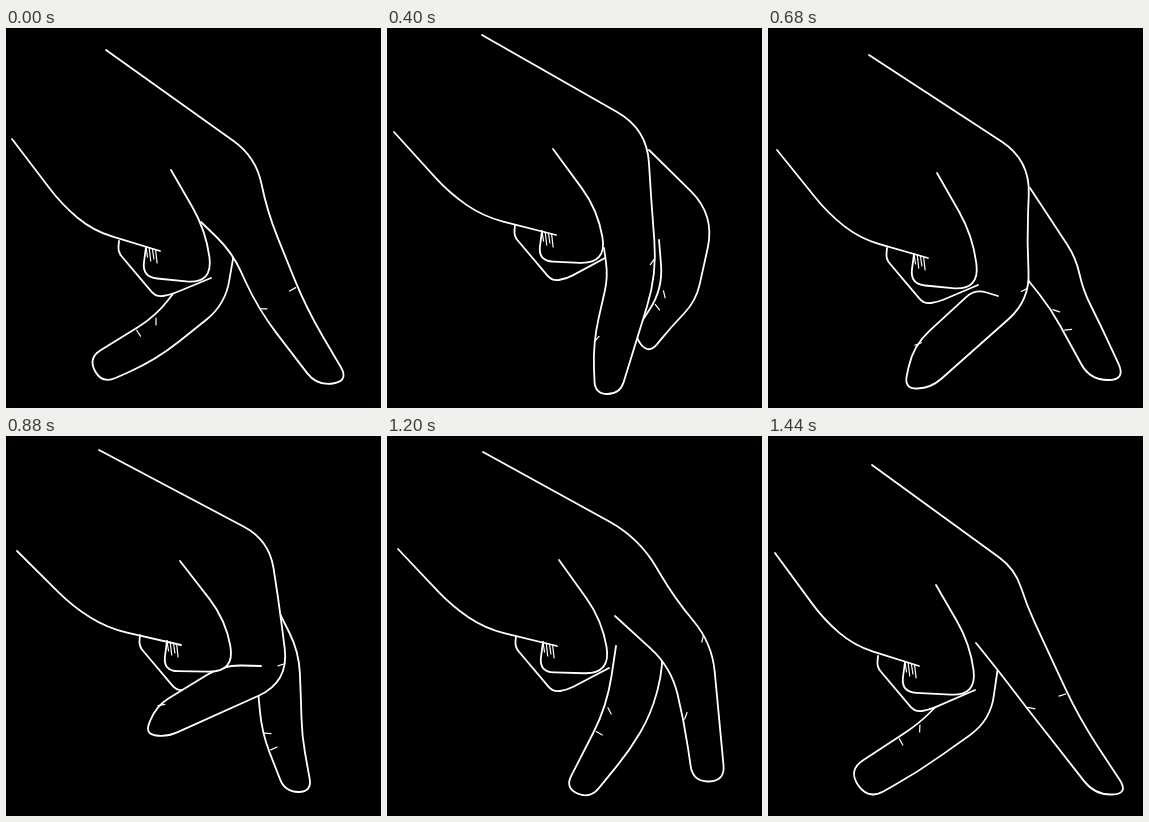
These frames come from a looping animation (375 by 380 pixels, 1480 ms). An HTML page with a canvas:

```html
<!DOCTYPE html>
<html lang="en">
<head>
<meta charset="utf-8">
<title>Walking fingers</title>
<style>
html, body { margin: 0; height: 100%; overflow: hidden; background: #000; }
canvas { display: block; }
</style>
</head>
<body>
<canvas width="375" height="380"></canvas>
<script>
const ctx = document.querySelector('canvas').getContext('2d');
const LOOP = 1480, STEP = 40, ROUNDING = 34;

// Corner points per pose.
// near: arm, knuckle, front, joint, two tip corners, rear joint, web, root
// far: root, knee, joint, pad, two tip corners, rear joint, end
// hand: palm crease, its lower corner, thumbnail, wrist
const poses = [
  { time: 0,
    near: [100,22, 250,129, 261,183, 300,280, 343,353, 311,358, 252,281, 226,224, 195,194],
    far: [248,150, 227,226, 220,276, 150,332, 96,356, 82,330, 150,288, 176,254],
    hand: [165,142, 207,256, 140,219, 6,111] },
  { time: 160,
    near: [95,15, 258,110, 267,195, 278,290, 312,359, 277,359, 247,312, 232,262, 218,217],
    far: [255,130, 258,230, 235,276, 200,308, 130,308, 118,275, 187,266, 218,235],
    hand: [170,131, 219,243, 154,211, 11,111] },
  { time: 400,
    near: [95,7, 260,101, 264,170, 270,246, 233,366, 208,366, 206,315, 221,249, 217,220],
    far: [262,122, 328,187, 309,273, 285,298, 262,326, 246,307, 276,261, 272,212],
    hand: [166,121, 220,236, 155,203, 7,104] },
  { time: 680,
    near: [101,27, 262,132, 259,215, 262,272, 163,360, 136,361, 145,318, 207,261, 230,268],
    far: [262,160, 308,230, 315,262, 333,298, 358,352, 322,352, 283,281, 260,252],
    hand: [169,145, 212,263, 146,226, 9,122] },
  { time: 880,
    near: [93,14, 263,104, 272,160, 283,246, 161,301, 139,298, 150,270, 217,229, 255,230],
    far: [274,178, 293,216, 295,265, 296,300, 306,356, 279,356, 256,297, 252,255],
    hand: [174,125, 229,236, 161,205, 11,115] },
  { time: 1200,
    near: [96,16, 252,102, 288,163, 325,207, 338,345, 306,346, 297,285, 284,231, 228,180],
    far: [270,150, 277,230, 264,278, 243,314, 203,363, 178,352, 220,270, 229,210],
    hand: [172,124, 224,238, 156,206, 11,113] },
  { time: 1440,
    near: [104,29, 247,133, 259,170, 311,282, 361,358, 327,359, 258,271, 229,233, 208,207],
    far: [248,150, 229,233, 223,284, 150,336, 100,364, 80,334, 152,287, 178,260],
    hand: [168,149, 209,260, 137,226, 7,117] }
];

const count = poses.length;
const poseAt = i => poses[(i + count) % count];
const timeAt = i => poseAt(i).time + Math.floor(i / count) * LOOP;

// Periodic cubic interpolation through unevenly spaced poses; returns [x, y] pairs.
function interpolate(part, i, time) {
  const [t0, t1, t2, t3] = [-1, 0, 1, 2].map(k => timeAt(i + k));
  const [a, b, c, d] = [-1, 0, 1, 2].map(k => poseAt(i + k)[part]);
  const span = t2 - t1, u = (time - t1) / span, s = 1 - u;
  const values = b.map((p, n) => {
    const before = (p - a[n]) / (t1 - t0);
    const slope = (c[n] - p) / span;
    const after = (d[n] - c[n]) / (t3 - t2);
    const v1 = (before * span + slope * (t1 - t0)) / (t2 - t0);
    const v2 = (slope * (t3 - t2) + after * span) / (t3 - t1);
    return p * s * s * (1 + 2 * u) + c[n] * u * u * (3 - 2 * u) + span * u * s * (v1 * s - v2 * u);
  });
  return values.flatMap((x, n) => n % 2 ? [] : [[x, values[n + 1]]]);
}

const mix = (a, b, u, v = u) => [a[0] + (b[0] - a[0]) * u, a[1] + (b[1] - a[1]) * v];
const shift = (p, dx, dy) => [p[0] + dx, p[1] + dy];
const dist = (a, b) => Math.hypot(b[0] - a[0], b[1] - a[1]) || 1;
const toward = (a, b, length) => mix(a, b, length / dist(a, b));

// Open line with softened corners; its black fill hides what lies behind it.
function outline(pts, filled = true) {
  ctx.beginPath();
  ctx.moveTo(...pts[0]);
  for (let i = 1; i < pts.length - 1; i++) {
    const [a, b, c] = pts.slice(i - 1, i + 2);
    const cut = Math.min(dist(a, b) / 2, dist(b, c) / 2, ROUNDING);
    ctx.lineTo(...toward(b, a, cut));
    ctx.quadraticCurveTo(...b, ...toward(b, c, cut));
  }
  ctx.lineTo(...pts.at(-1));
  if (filled) ctx.fill();
  ctx.stroke();
}

function mark(a, b) {
  ctx.lineWidth = 1.2;
  ctx.beginPath();
  ctx.moveTo(...a);
  ctx.lineTo(...b);
  ctx.stroke();
  ctx.lineWidth = 1.8;
}

function crease(edge, inside) {
  mark(toward(edge, inside, 2), toward(edge, inside, 9));
}

function draw(time) {
  const i = poses.findLastIndex(p => p.time <= time);
  const [near, far, hand] = ['near', 'far', 'hand'].map(part => interpolate(part, i, time));
  const [palm, corner, nail, wrist] = hand;
  ctx.fillStyle = '#000';
  ctx.fillRect(0, 0, 375, 380);
  ctx.strokeStyle = '#fff';
  ctx.lineWidth = 1.8;
  ctx.lineCap = ctx.lineJoin = 'round';

  outline(far);
  crease(far[6], far[3]);
  crease(mix(far[6], far[5], 0.3), far[3]);

  // Curled finger behind the thumb
  outline([shift(nail, -27, -6), shift(nail, -28, 5), shift(nail, 10, 50), shift(nail, 24, 48), shift(corner, -2, -6)]);

  outline(near);
  crease(mix(near[2], near[3], 0.78), near[6]);
  crease(near[6], near[3]);

  outline([palm, mix(palm, corner, 0.83, 0.53), corner, shift(nail, -4, 30), nail]);

  const thumb = shift(nail, 14, 4);
  outline([wrist, mix(wrist, thumb, 0.34, 0.59), mix(wrist, thumb, 0.55, 0.82), thumb], false);
  for (let k = 0; k < 4; k++) {
    const top = shift(nail, 3.2 * k, k);
    mark(top, shift(top, 1.5, 10 + 3 * (k % 2)));
  }
}

function frame(now) {
  draw(Math.floor(now % LOOP / STEP) * STEP);
  requestAnimationFrame(frame);
}
requestAnimationFrame(frame);
</script>
</body>
</html>
```
